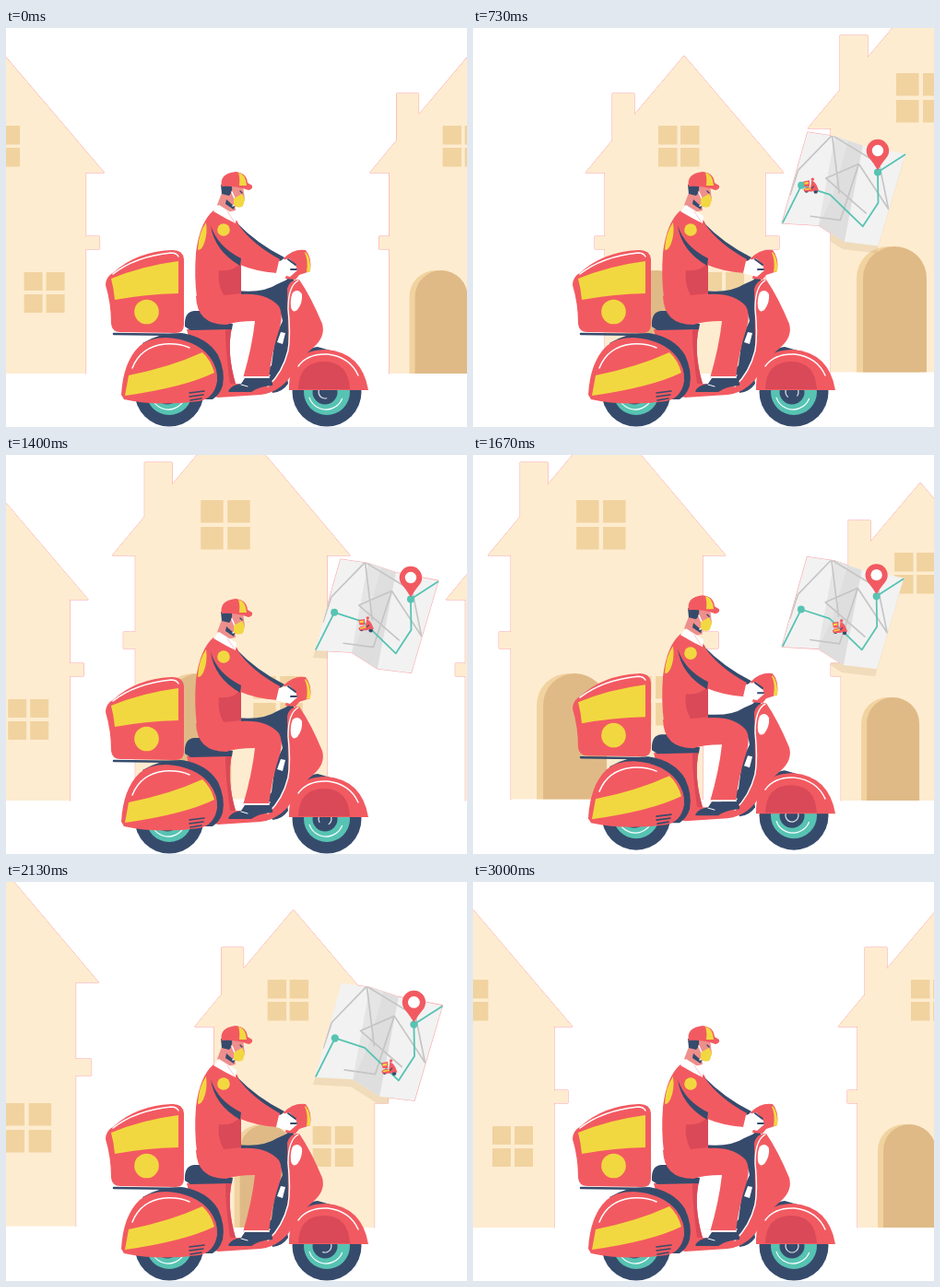
An HTML page with a canvas that plays this animation: 500 px wide and 433 px high, repeating every 3.03 s.

```html
<!DOCTYPE html>
<html lang="en">
<head>
<meta charset="utf-8">
<title>Scooter delivery</title>
<style>
  html, body { margin: 0; width: 100%; height: 100%; overflow: hidden; background: #fff; }
  canvas { display: block; width: 500px; height: 433px; }
</style>
</head>
<body>
<canvas id="stage" width="500" height="433"></canvas>
<script>
const g = document.getElementById('stage').getContext('2d');
const LOOP = 3030, STEP = 100 / 3;
const RED = '#f25a61', DARK = '#da4958', NAVY = '#364b6c', YELLOW = '#f2d840',
      TEAL = '#57c3b3', SKIN = '#ee8f8c', WHITE = '#fff',
      WALL = '#feecd0', PANE = '#f1d3a0', DOOR = '#dfba87', EDGE = '#fa9ea2';

function fill(d, color) {
  g.fillStyle = color;
  g.fill(new Path2D(d));
}
function line(d, color, width) {
  g.strokeStyle = color;
  g.lineWidth = width;
  g.lineCap = g.lineJoin = 'round';
  g.stroke(new Path2D(d));
}
function disc(x, y, r, color) {
  g.fillStyle = color;
  g.beginPath();
  g.arc(x, y, r, 0, 7);
  g.fill();
}
function ring(x, y, r, from, to, color) {
  g.strokeStyle = color;
  g.lineWidth = 1.2;
  g.beginPath();
  g.arc(x, y, r, from, to);
  g.stroke();
}
function at(x, y, scale, draw) {
  g.save();
  g.translate(x, y);
  g.scale(scale, scale);
  draw();
  g.restore();
}
function blend(mode, draw) {
  g.globalCompositeOperation = mode;
  draw();
  g.globalCompositeOperation = 'source-over';
}

// Houses, drawn around the x of the roof apex
function panes(x, y, size, pitch) {
  g.fillStyle = PANE;
  for (const dx of [0, pitch]) for (const dy of [0, pitch]) g.fillRect(x + dx, y + dy, size, size);
}
function arch(x, top, width, bottom, color) {
  const r = width / 2;
  fill(`M${x} ${bottom}V${top + r}a${r} ${r} 0 0 1 ${width} 0V${bottom}Z`, color);
}
function walls(d) {
  line(d, EDGE, 1);
  fill(d + 'Z', WALL);
}
function smallHouse() {
  walls('M88 375V240H103V226H88V157H108L0 30L-54 94V71H-78V122L-107 157H-86V226H-97V240H-86V375');
  panes(-28, 106, 20.5, 24);
  panes(21, 265, 20, 24);
  arch(-64, 263, 57, 375, PANE);
  arch(-58, 263, 57, 375, DOOR);
}
function bigHouse() {
  walls('M104 373.5V210H121V192H104V109H129L0 -44L-64 32V8H-94V67L-129 109H-104V192H-117V210H-104V373.5');
  panes(-33, 49, 24.5, 29);
  panes(24, 240, 24.5, 29);
  arch(-76, 237, 69, 373.5, PANE);
  arch(-69, 237, 69, 373.5, DOOR);
}
function street(i) {
  const shift = Math.min(1106, 1.4 + 12.39 * i);
  for (const x of [0, 503, 1106, 1609]) at(x - shift, 0, 1, smallHouse);
  at(766 - shift, 0, 1, bigHouse);
}

// Map, drawn around its bottom left corner
const SHEET = 'M0 0L25 -89L52 -85L79 -76L120.5 -68L94 22L61 18L36 2Z';
const ROUTE = [[14, 19, -39], [22, 28, -36], [36, 44, -29], [76, 81, 0], [90, 94, -19]];

function routePoint(i) {
  let k = 1;
  while (k < ROUTE.length - 1 && i > ROUTE[k][0]) k++;
  const [t0, x0, y0] = ROUTE[k - 1], [t1, x1, y1] = ROUTE[k];
  const u = Math.max(0, Math.min(1, (i - t0) / (t1 - t0)));
  return [x0 + (x1 - x0) * u, y0 + (y1 - y0) * u];
}
function miniScooter() {
  disc(-4, 4, 2, NAVY);
  disc(5, 5, 2, NAVY);
  fill('M-7 -5L-1 -6V0H-6Z', RED);
  fill('M-6 -4L-2 -4.5V-2.5L-6 -2Z', YELLOW);
  fill('M-7 3Q-5 0 0 1L1 -6L4 -4L6 -1L8 4H4L1 5H-6Z', RED);
  line('M-5 3L0 2', YELLOW, 1.3);
  line('M1 2L3 0', NAVY, 1);
  disc(2, -7, 1.5, RED);
}
function map(i) {
  fill(SHEET, '#f2f2f2');
  fill('M52 -85L79 -76L61 18L36 2Z', '#dedede');
  fill('M52 -85L65 -81L50 -28L36 2Z', '#e5e5e5');
  g.save();
  g.clip(new Path2D(SHEET));
  line('M8 -28L16 -52L49 -86L56 -30M49 -86L95 -58L104 -14M28 -7L57 -3L75 -58L43 -44L82 -10M75 -58L104 -14',
    '#c5c5c5', 1.5);
  g.restore();
  line('M1 -1L19 -37L47 -28L79 3L94 -20L93.5 -50L120 -67', TEAL, 1.6);
  disc(19, -37, 3.6, TEAL);
  disc(93.5, -50, 3.6, TEAL);
  const [x, y] = routePoint(i);
  at(x, y, 1, miniScooter);
  fill('M93.5 -52Q90 -58 85 -64A11 11 0 1 1 102 -64Q97 -58 93.5 -52Z', RED);
  disc(93.5, -71, 5.6, WHITE);
}
function mapScale(i) {
  const grow = Math.max(0, Math.min(1, (i - 8) / 7, (88 - i) / 7));
  return grow * grow * (3 - 2 * grow) * (1.08 + 0.08 * Math.cos(Math.PI * (i - 5.7) / 10));
}

function wheel(x, y, i) {
  disc(x, y, 37.5, NAVY);
  disc(x, y, 25, TEAL);
  ring(x - 1, y, 19, 0.4, 2.8, WHITE);
  disc(x - 2, y, 13.5, NAVY);
  ring(x - 2, y, 7, i * 0.33, i * 0.33 + 4.6, '#dfe6ea');
}
function scooter(i) {
  // far leg and floor
  fill('M250 285Q279 288 294 278L312 270L312 330L300 372L287 392L268 391L288 366L292 335L300 318Q298 299 274 293L250 292Z', NAVY);
  fill('M298 330L294 341L300 343L303 331Z', WHITE);
  fill('M269 378L284 376L288 369L296 374L292 385L270 387Z', NAVY);
  line('M275 377L286 377', WHITE, 1.5);
  wheel(177, 395, i);
  wheel(348, 395, i + 4);
  fill('M288 392L304 372L306 386Q300 395 289 396Z', NAVY);
  fill('M316 364Q325 347 338 346L352 350L330 370Z', NAVY);

  // frame and seat
  fill('M196 327L245 325Q239 352 249 386L282 388Q302 374 308 352L314 369Q301 395 276 398L230 401L214 396Z', RED);
  fill('M238 328L245 325Q239 352 249 386L243 386Q238 350 238 328Z', DARK);
  fill('M148 342Q166 331 190 331Q218 335 230 355Q238 372 235 388Q232 398 224 403L200 403Z', NAVY);
  fill('M194 324Q193 308 204 307L216 307Q226 318 246 321L245 327L200 328Z', NAVY);

  // rear shell
  fill('M125 398Q127 362 145 345Q155 336 174 336Q206 338 221 357Q230 369 229 383Q226 402 209 405Q164 411 128 403Z', RED);
  fill('M133 377Q178 368 213 352Q222 360 226 374Q193 390 129 399Z', YELLOW);
  line('M137 369Q146 346 172 343Q188 342 199 347', WHITE, 1.5);
  line('M199 396L215 394M199 400L214 398M200 404L212 402', NAVY, 1.6);

  // delivery box
  line('M117 332L194 333', NAVY, 2.5);
  fill('M108 279Q108 270 117 265Q141 243 179 241Q192 240 193 251V322Q193 331 184 331L124 330Q115 330 114 321Q114 299 108 279Z', RED);
  fill('M114 272Q148 258 187 253V288Q150 289 118 295Q117 283 114 272Z', YELLOW);
  line('M116 267Q140 248 179 244Q185 244 187 248', WHITE, 1.5);
  disc(152.5, 308, 13.3, YELLOW);

  // front shield and handlebar
  fill('M305 283Q308 272 318 273Q331 292 343 321Q347 335 333 347Q320 358 312 372Q300 393 277 396Q303 374 306 344Q306 315 305 283Z', RED);
  line('M317 274Q306 280 306 305Q309 333 306 350Q300 374 284 389', WHITE, 1.4);
  fill('M311 287Q317 282 321 289Q322 298 316 306Q311 310 309 303Q308 294 311 287Z', WHITE);
  line('M312 269L300 281', NAVY, 5);
  fill('M301 250Q312 239 325 241Q332 249 330 264L318 268L314 273L303 272Q307 260 301 250Z', RED);
  fill('M325 243Q331 250 330 264L326 265Q328 252 324 244Z', YELLOW);

  // front fender
  fill('M307 393Q306 349 347 349Q386 352 393 393Z', RED);
  fill('M317 392Q318 362 345 362Q371 362 373 392Z', DARK);
  line('M317 367Q327 353 349 354Q373 357 382 377', WHITE, 1.4);
}
function rider() {
  // near leg
  fill('M206 291Q228 287 254 289Q283 287 296 302Q301 310 297 325Q288 352 285 380L257 380Q267 346 270 318Q250 318 239 322Q207 322 206 291Z', RED);
  line('M258 379L285 379', WHITE, 2);
  fill('M241 394Q245 387 255 386L259 380L285 380Q290 383 289 388Q274 389 266 395H242Z', NAVY);
  line('M255 387L262 389', WHITE, 1);

  // head
  fill('M234 179L246 176L249 198L240 200L229 192Z', SKIN);
  fill('M240 171L257 171L259 186L256 194L247 194L240 185Z', SKIN);
  fill('M233 170L245 171Q246 178 242 182L234 180Z', NAVY);
  fill('M239 186L248 194L247 197L238 191Z', NAVY);
  line('M245 178L248 185M246 193L249 191', WHITE, 1.5);
  fill('M247 185L256 180L259 186L257 193Q252 197 247 192Z', YELLOW);
  line('M254 177L256 179', NAVY, 1.4);
  fill('M234 172Q231 158 249 156Q261 157 262 168L267 171Q268 175 263 176Q249 171 234 172Z', RED);
  fill('M252 157Q260 158 261 171L253 171Q254 163 252 157Z', YELLOW);

  // jacket
  fill('M225 198Q242 200 251 210Q258 226 255 250L255 289Q232 294 207 293Q204 270 206 244Q210 211 225 198Z', RED);
  fill('M231 263Q247 265 255 254V288L236 290Q229 278 231 263Z', DARK);
  fill('M217 211Q219 225 214 236Q210 243 208 240Q209 222 217 211Z', YELLOW);

  // arms
  fill('M250 211Q272 234 302 249L296 255Q268 240 250 216Z', NAVY);
  fill('M224 206Q242 199 251 212Q266 234 297 251L294 266Q270 264 254 257Q228 243 222 215Z', RED);
  fill('M222 214Q229 237 255 250L254 258Q226 242 222 214Z', NAVY);
  disc(236, 219, 6.8, YELLOW);
  fill('M225 199L231 192L250 204L249 212L239 207Z', WHITE);
  line('M240 199L248 211', '#f4bcbc', 0.8);

  // glove
  fill('M296 253L307 250L314 257L316 263L308 270L293 266Z', WHITE);
  line('M306 251L314 257M309 262L315 262', NAVY, 2);
}

// a short hop, five times per loop
function hop(i) {
  const r = i % 18;
  return r > 10.5 && r < 16.5 ? -4 * Math.sin(Math.PI * (r - 10.5) / 6) : 0;
}

function draw(now) {
  const i = Math.floor(((now % LOOP) + 4) / STEP) % 91;
  const y = hop(i), scale = mapScale(i);
  g.clearRect(0, 0, 500, 433);
  street(i);
  if (scale > 0) {
    // the shadow falls on houses only, the thin edge shows beside them only
    blend('source-atop', () => at(333, 220 + y, scale, () => fill(SHEET, 'rgba(190,160,110,.22)')));
    at(335, 212 + y, scale, () => map(i));
    blend('destination-over', () => at(335, 212 + y, scale, () => line(SHEET, EDGE, 1)));
  }
  at(0, y, 1, () => { scooter(i); rider(); });
}

const start = performance.now();
function tick() {
  draw(performance.now() - start);
  requestAnimationFrame(tick);
}
tick();
</script>
</body>
</html>
```
